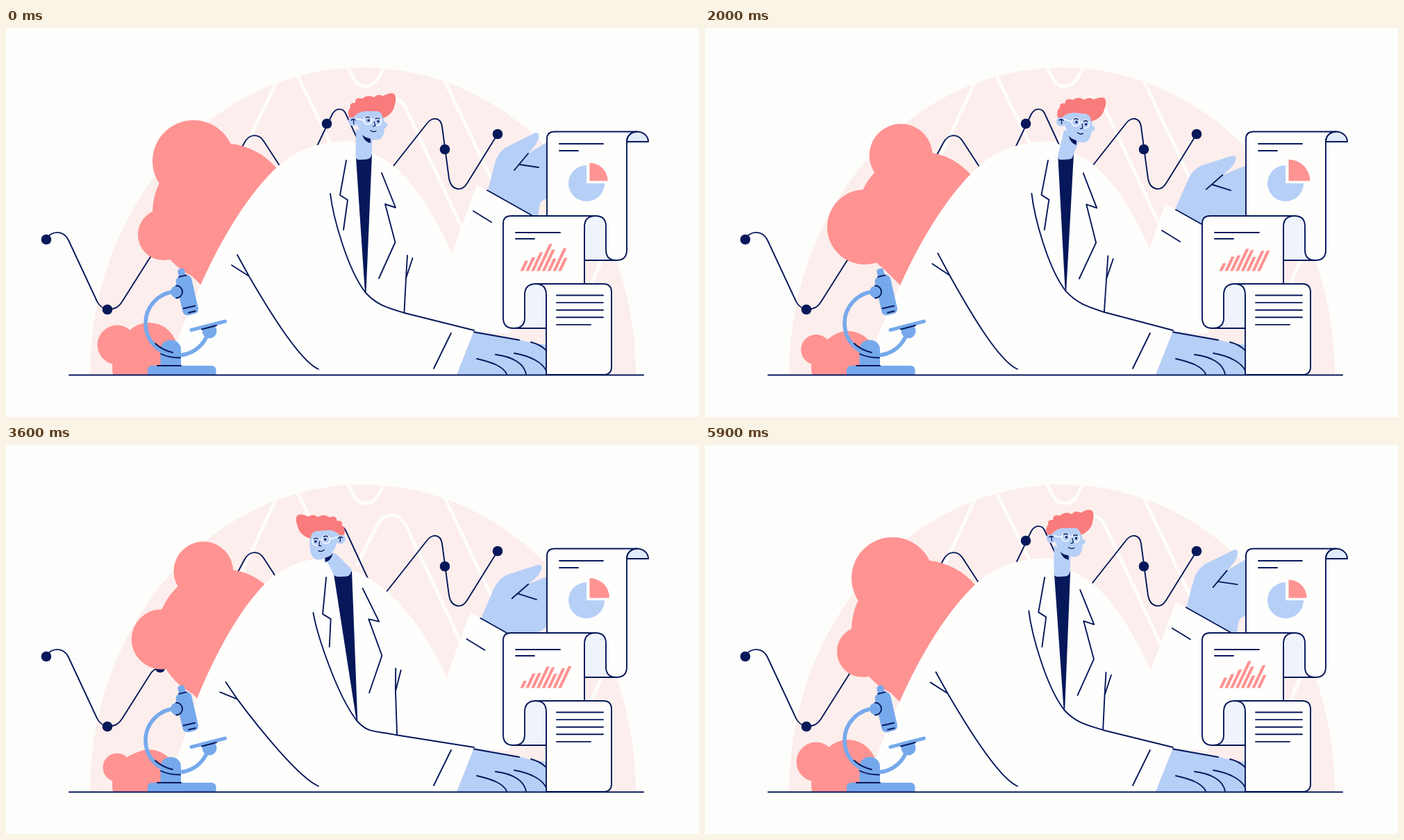
Animation of 998 by 561 pixels, one loop 5.95 s. Source, as an HTML page with a canvas:

```html
<!DOCTYPE html>
<html lang="en">
<head>
<meta charset="utf-8">
<title>Researcher</title>
<style>
html, body { margin: 0; width: 100%; height: 100%; overflow: hidden; background: #fdfdfb; }
canvas { display: block; width: 998px; height: 561px; }
</style>
</head>
<body>
<canvas id="stage" width="998" height="561"></canvas>
<script>
const g = document.getElementById('stage').getContext('2d');
const LOOP = 5950, TAU = Math.PI * 2;
const NAVY = '#06185a', CORAL = '#fe9392', HAIR = '#f97b7b', PINK = '#fceeec';
const BLUE = '#76a9ec', SKIN = '#b6cff7', PALE = '#eff4fc', CURL = '#e2ebfb';
const BACK = '#fdfdfb', WHITE = '#fefefd';
const TIMES = [0, 1250, 2000, 2850, 4400, 5200];

// Smooth periodic curve through one value per entry of TIMES.
function key(t, vals) {
  const n = TIMES.length;
  const at = i => TIMES[(i + n) % n] + LOOP * Math.floor(i / n);
  const val = i => vals[(i + n) % n];
  const slope = i => {
    const a = at(i) - at(i - 1), b = at(i + 1) - at(i);
    return ((val(i) - val(i - 1)) / a * b + (val(i + 1) - val(i)) / b * a) / (a + b);
  };
  let i = n - 1;
  while (t < at(i)) i--;
  const h = at(i + 1) - at(i), u = (t - at(i)) / h, v = 1 - u;
  return val(i) * v * v * (1 + 2 * u) + val(i + 1) * u * u * (3 - 2 * u) +
    h * u * v * (v * slope(i) - u * slope(i + 1));
}

function ease(t, from, to) {
  const u = Math.min(1, Math.max(0, (t - from) / (to - from)));
  return u * u * (3 - 2 * u);
}

function fill(path, color) {
  g.fillStyle = color;
  g.fill(typeof path === 'string' ? new Path2D(path) : path);
}
function line(path, color = NAVY, width = 1.9) {
  g.strokeStyle = color;
  g.lineWidth = width;
  g.stroke(typeof path === 'string' ? new Path2D(path) : path);
}
function disc(x, y, r, color) {
  g.fillStyle = color;
  g.beginPath();
  g.arc(x, y, r, 0, TAU);
  g.fill();
}
function box(x, y, w, h, r, color) {
  g.fillStyle = color;
  g.beginPath();
  g.roundRect(x, y, w, h, r);
  g.fill();
}
function placed(x, y, deg, draw) {
  g.save();
  g.translate(x, y);
  g.rotate(deg * Math.PI / 180);
  draw();
  g.restore();
}

function backdrop() {
  g.save();
  g.beginPath();
  g.ellipse(514, 500, 393, 443, 0, Math.PI, TAU);
  g.closePath();
  g.fillStyle = PINK;
  g.fill();
  g.clip();
  line('M391 74 L340 182 M416 61 L476 184 M489 50 L501 73 Q507 84 518 84 Q530 84 537 71 L548 50' +
    'M506 172 L534 117 Q542 101 555 101 Q568 101 576 116 L664 304 M629 70 L716 254 M860 330 L840 375', BACK, 5);
  g.restore();
  line('M58 304 C65 293 82 290 90 306 L131 394 C137 408 158 410 167 395 L208 330 Q214 321 222 322' +
    'M325 200 L343 166 C350 152 364 152 371 163 L410 223 M440 187 L470 124 C475 115 485 115 489 123' +
    'L526 203 M536 217 Q545 216 550 209 L606 138 C614 127 626 129 628 142 L638 217' +
    'C641 234 656 237 664 224 L708 153');
  [[58, 305], [146, 406], [222, 321], [462, 138], [632, 175], [708, 153]]
    .forEach(([x, y]) => disc(x, y, 7.3, NAVY));
}

function bushes(t, c) {
  disc(278 - 8 * c, 186.5 + 5.5 * c, 50 + 9 * c, CORAL);
  disc(312, key(t, [267, 269, 272, 275, 271, 268]), key(t, [101, 96, 93, 94, 97, 100]), CORAL);
  disc(key(t, [227, 228, 230, 229, 220, 224]), key(t, [298, 294, 287, 279, 287, 296]),
    key(t, [37, 47, 54, 51, 36, 37]), CORAL);
  fill('M232 322 L282 372 L340 300Z', CORAL);
  g.save();
  g.beginPath();
  g.rect(100, 400, 200, 100);
  g.clip();
  disc(160, 461.5 - 4.5 * c, 24 + 4.4 * c, CORAL);
  disc(206, 474 - 8 * c, 41, CORAL);
  disc(201, 490, 48, CORAL);
  g.restore();
}

function raisedHand(t) {
  placed(key(t, [740, 729, 731, 728, 745, 731]), key(t, [197, 233, 226, 213, 218, 210]),
    key(t, [0, 7, 9, 2, 15, 4]), () => {
      fill('M-47 40 L-36 -2 Q-32 -17 -20 -25 L20 -45 Q29 -49 27 -38 Q24 -28 12 -16 L40 -33 L70 -40' +
        'L70 20 L39 49 Q28 52 28 62 L24 90 L-30 80Z', SKIN);
      line('M-8 8 L12 -16 M0 0 L27 4');
    });
}

function coat(t, b) {
  const wx = key(t, [693, 676, 678, 681, 685, 685]), wy = key(t, [234, 268, 262, 250, 252, 248]);
  const vx = key(t, [642, 640, 640, 636, 635, 637]), vy = key(t, [325, 310, 318, 328, 337, 328]);
  const tipX = 518 + .42 * b, tipY = 382 - .57 * b;
  fill(`M232 500 C243 452 262 412 ${281 + .25 * b} 369
    C${312 + .35 * b} 300 ${350 + .5 * b} 238 ${392 + .62 * b} 199
    C${420 + .7 * b} 174 ${460 + .85 * b} 161 ${500 + b} 164 L${527 + b} 181
    C${568 + .9 * b} 195 ${608 + .4 * b} 248 ${vx} ${vy}
    L${wx - 15} ${wy - 8} L${wx} ${wy} L${wx + 64} ${wy + 36} L725 441 L674 437 L649 500Z`, WHITE);
  fill(`M${504 + 1.1 * b} 187 L${527 + b} 182 L${tipX + .5} ${tipY} L${tipX - 1} ${tipY}Z`, NAVY);

  line(`M${wx} ${wy} l64 36 M${wx - 20} ${wy + 30} l26 16`);
  line(`M${467 + .85 * b} ${239 - .1 * b}
    C${471 + .8 * b} 272 ${491 + .55 * b} ${347 - .4 * b} ${tipX} ${tipY}
    C${tipX + 17} ${tipY + 18} ${548 + .6 * b} ${403 - .3 * b} ${574 + .4 * b} ${411 - .25 * b} L674 436`);
  line(`M${490 + b} 191 L${481 + .86 * b} ${241 - .1 * b} L${492 + .84 * b} ${248 - .1 * b} L${486 + .7 * b} 291`);
  line(`M${541 + .95 * b} ${209 + .08 * b} L${561 + .82 * b} ${259 + .15 * b} L${546 + .82 * b} ${254 + .1 * b}
    L${560.5 + .66 * b} ${309 + .18 * b} L${537 + .48 * b} ${361 + .13 * b}`);
  line(`M${578 + .58 * b} ${328 + .2 * b} L${576 + .52 * b} ${361 + .2 * b} L${573.5 + .36 * b} ${410 - .25 * b}
    M${585.5 + .58 * b} ${332 + .25 * b} L${576 + .52 * b} ${361 + .2 * b}`);
  const cx = 350 + .58 * b, cy = 358 - .3 * b;
  line(`M${333 + .57 * b} ${327 - .52 * b} L${cx} ${cy} C${376 + .4 * b} ${403 - .2 * b} 422 480 450 492
    M${325 + .58 * b} ${342 - .5 * b} L${cx} ${cy}`);
  line('M641 440 L616 491');

  fill('M674 437 L739 449 Q755 455 780 457 L780 500 L649 500Z', SKIN);
  line('M674 438.5 L739 450 M756 453 Q769 456 778 465' +
    'M678 477 C700 482 716 488 721 499 M705 471 C730 474 746 484 749 499 M732 469 C755 473 772 482 778 494');
}

// Alternating anchors and control points, both ends shared.
const HAIR_SHAPE = [[-3, -13], [-10, -13], [-17, -8], [-19, -3], [-27, -4], [-30, -14], [-25, -18],
  [-27, -26], [-18, -25], [-19, -34], [-8, -31], [0, -38], [9, -33], [14, -39], [22, -35],
  [33, -41], [38, -38], [42, -34], [39, -23], [37, -9], [22, -3], [20, -12], [14, -13], [5, -13], [-3, -13]];
const FACE_SHAPE = [[0, -20], [20, -20], [21, -8], [25, 0], [24, 12], [24, 22], [18, 27], [12, 30],
  [4, 27], [-8, 22], [-14, 10], [-18, 0], [-18, -10], [-18, -20], [0, -20]];

// Turns a shape towards its mirror image without flattening it.
function turned(shape, s) {
  const k = (1 - s) / 2, n = shape.length - 1;
  const pts = shape.map(([x, y], i) => {
    const [mx, my] = shape[n - i];
    return [x + (-mx - x) * k, y + (my - y) * k];
  });
  const p = new Path2D();
  p.moveTo(...pts[0]);
  for (let i = 1; i < n; i += 2) p.quadraticCurveTo(...pts[i], ...pts[i + 1]);
  p.closePath();
  return p;
}

function head(t, b) {
  const s = 1 - 2 * (ease(t, 2150, 2700) - ease(t, 4550, 5050));
  const x = key(t, [521, 558.5, 534, 483, 464, 499]), y = key(t, [133, 141.5, 135.5, 135, 136, 132]);
  const tilt = key(t, [0, 17, 6, 0, -8, -5]);
  const mid = x - 4 * s;
  const lean = tilt * .35;
  fill(`M${503.5 + 1.1 * b} 186 L${mid - 13} ${y + 12 - lean * .3} L${mid + 11} ${y + 22 + lean * .4}
    L${526.5 + b} ${182 + .1 * b} Q${526 + b} 189 ${519 + b} 189.5 L${509 + b} 190 Q${504 + 1.1 * b} 190 ${503.5 + 1.1 * b} 186Z`, SKIN);

  placed(x, y, tilt, () => {
    fill(`M${-8 * s} 21 Q${-3 * s} 26 ${4 * s} 26 L${4 * s} 33 Q${-5 * s} 31 ${-8 * s} 21Z`, NAVY);
    disc(-21 * s, 1.5, 7, SKIN);
    if (s > 0) disc(24 * s, 7, 4.2, SKIN);
    fill(turned(FACE_SHAPE, s), SKIN);
    fill(turned(HAIR_SHAPE, s), HAIR);
    line(`M${-24 * s} 0 Q${-21 * s} -3 ${-18 * s} 0 M${-21 * s} -1 L${-20 * s} 5`, NAVY, 1.3);
    for (const side of [-1, 1]) {
      const ex = 7 * s + 7 * side, ey = 1 + .8 * s * side;
      g.strokeStyle = WHITE;
      g.lineWidth = 1.4;
      g.beginPath();
      g.arc(ex, ey, 5.8, 0, TAU);
      g.stroke();
      disc(ex + s, ey, 1.7, NAVY);
      line(`M${ex - 3} ${ey - 4} Q${ex} ${ey - 6} ${ex + 3} ${ey - 4}`, NAVY, 1.3);
    }
    line(`M${-6 * s} 0 L${-17 * s} -2`, WHITE, 1.4);
    line(`M${9 * s} 2 L${11 * s} 8 L${7.5 * s} 9`, NAVY, 1.3);
    line(`M${4 * s} 15 Q${8 * s} 18 ${12 * s} 15.5`, NAVY, 1.4);
  });
}

function microscope() {
  g.strokeStyle = BLUE;
  g.lineWidth = 5.5;
  g.beginPath();
  g.arc(247, 426, 46, -1.6, .45, true);
  g.stroke();
  box(222.5, 450, 29.5, 40, [14, 14, 0, 0], BLUE);
  box(204, 487, 98.5, 13.5, [6, 6, 2, 2], BLUE);
  line('M218 487 L252 487 M215 455 Q224 464 240 468 M223 470 Q236 476 251 475.5');
  placed(260, 384, -13, () => {
    box(-11, -27, 23, 57, 7, BLUE);
    box(-5, -38, 10, 15, 4, BLUE);
    line('M-5 -27 L6 -27');
    line('M-9 19 L8 19 M-3 26.5 L7 26.5');
  });
  disc(246, 380.5, 9, BLUE);
  line('M245 371.5 A9 9 0 0 1 245 389.5');
  disc(293, 437, 10.5, BLUE);
  fill('M265 428 L317 414 L317 424 L268 436Z', WHITE);
  line('M267 435.5 L315.5 423', BLUE, 5);
  line('M282 434.5 L303 429');
}

function papers(c, t) {
  const curl = 'M894 164 C894 155 901 149.5 909 149.5 C918 149.5 925 156 925 164Z';
  const sheet1 = 'M779 290 L779 160 Q779 149.5 790 149.5 L909 149.5 C900 149.5 894 156 894 164 L894 320' +
    'Q894 335 879 335 L833 335';
  fill(sheet1, WHITE);
  fill(curl, CURL);
  line(sheet1);
  line(curl);
  line('M797 167 L860 167 M797 177 L824 177');
  fill('M836 224 L836 198 A26 26 0 1 0 862 224Z', SKIN);
  const r = 29.3 - 3.2 * Math.cos(2 * TAU * t / LOOP);
  fill(`M840.5 220.5 v${-r} a${r} ${r} 0 0 1 ${r} ${r}Z`, CORAL);

  const back1 = 'M833 335 L833 271 L849 271 Q864 271 864 286 L864 320 Q864 335 879 335Z';
  fill(back1, PALE);
  line(back1);
  const sheet2 = 'M747 433 L731 433 Q716 433 716 418 L716 282 Q716 271 727 271 L849 271 Q833 271 833 287' +
    'L833 372 L763 372 Q747 372 747 385 L747 418 Q747 433 731 433Z';
  fill(sheet2, WHITE);
  line('M731 433 Q716 433 716 418 L716 282 Q716 271 727 271 L849 271 Q833 271 833 287 L833 369');
  line('M734 295 L798 295 M734 304 L761 304');
  const high = [15, 20, 27, 39, 31, 18, 33, 19], low = [10, 21, 21, 30, 30, 21, 28, 33];
  high.forEach((h, i) => {
    const tall = low[i] + (h - low[i]) * (1 + c) / 2, x = 740.5 + 7.8 * i;
    fill(`M${x} 350.5 l${.47 * tall} ${-tall} h4.6 l${-.47 * tall} ${tall}Z`, CORAL);
  });

  const back2 = 'M778 433 L731 433 Q747 433 747 418 L747 385 Q747 369 763 369 L778 369Z';
  fill(back2, PALE);
  line(back2);
  const sheet3 = 'M778 500 L778 385 Q778 369 763 369 L860 369 Q872 369 872 381 L872 489 Q872 500 860 500Z';
  fill(sheet3, WHITE);
  line(sheet3);
  for (let i = 0; i < 5; i++) line(`M793 ${385.5 + 10.6 * i} H${i < 4 ? 860 : 842}`);
}

function draw(t) {
  const b = key(t, [0, 17, 4, -18, -29, -14]);
  const c = Math.cos(TAU * t / LOOP);
  g.fillStyle = BACK;
  g.fillRect(0, 0, 998, 561);
  g.lineCap = g.lineJoin = 'round';
  backdrop();
  bushes(t, c);
  raisedHand(t);
  coat(t, b);
  head(t, b);
  microscope();
  papers(c, t);
  line('M91 500.5 H918');
}

const start = performance.now();
function tick() {
  const t = Math.max(0, performance.now() - start) % LOOP;
  draw(Math.floor(t / 50) * 50);
  requestAnimationFrame(tick);
}
tick();
</script>
</body>
</html>
```
